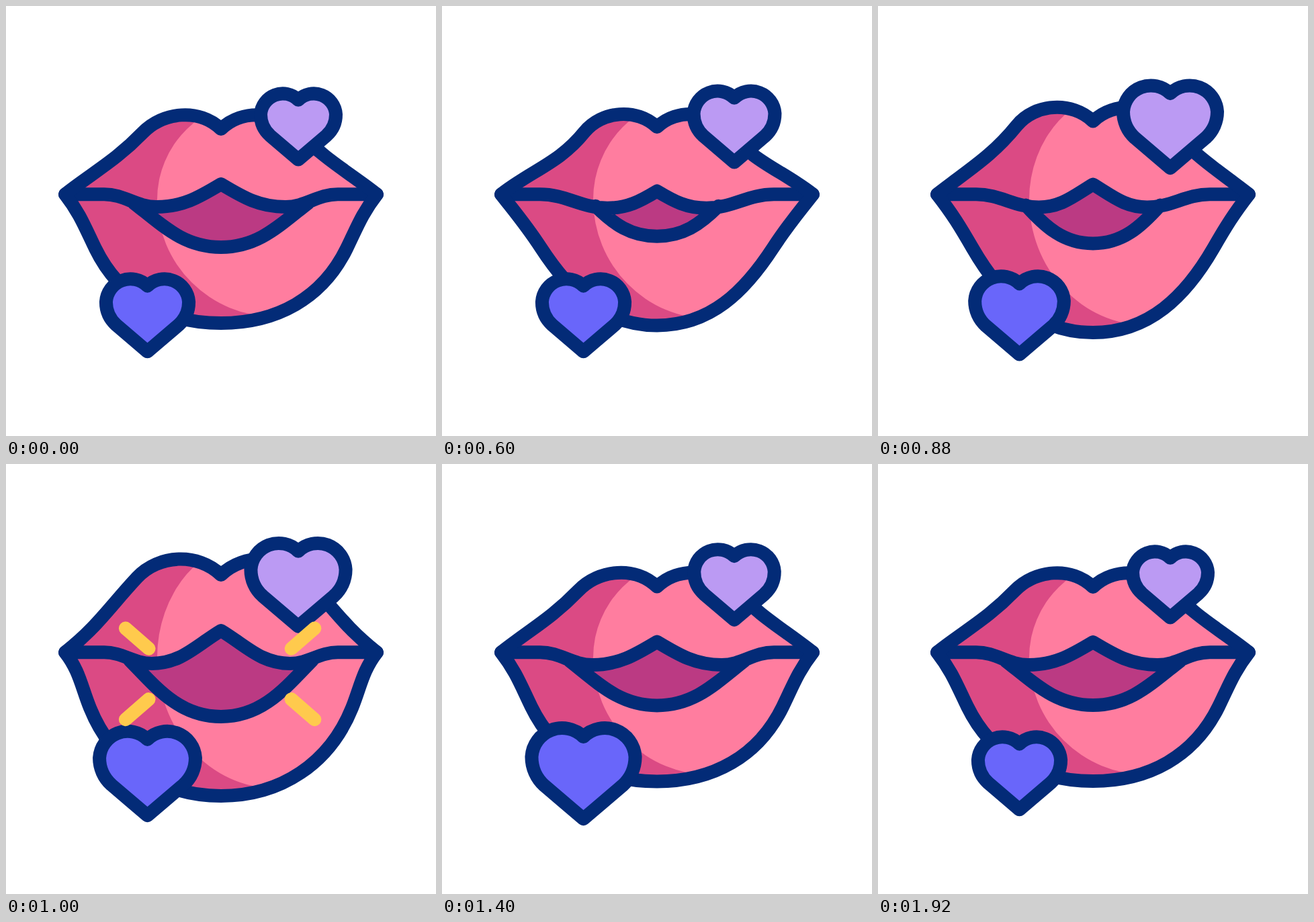
An HTML page for the animation above (2000 ms loop, 640 by 640 pixels).

```html
<!DOCTYPE html>
<html lang="en">
<head>
<meta charset="utf-8">
<title>Kiss</title>
<style>
  html, body { margin: 0; width: 100%; height: 100%; overflow: hidden; background: #fff; }
  svg { display: block; width: 100%; height: 100%; }
  path { fill: none; stroke-width: 20; stroke-linejoin: round; stroke-linecap: round; }
  .ink { stroke: #032b77; }
  #light { fill: #ff7d9f; }
  #mouth { fill: #bb3a83; }
  #lilac { fill: #bb9af3; }
  #blue { fill: #6966fa; }
  #rays { stroke: #ffca4d; }
</style>
</head>
<body>
<svg viewBox="0 0 640 640">
  <clipPath id="clip"><path id="mask"/></clipPath>
  <g clip-path="url(#clip)">
    <rect width="640" height="640" fill="#db4a84"/>
    <path id="light"/>
  </g>
  <path id="mouth"/>
  <path id="seam" class="ink"/>
  <path id="lips" class="ink"/>
  <path id="lilac" class="ink"/>
  <path id="blue" class="ink"/>
  <path id="rays"/>
</svg>
<script>
const LOOP = 2000, STEP = 40;
const MID = 320, LEFT = 88, SEAM = 280.3, FORK = 146;

// Points are [x, y] or [x, y, heading in degrees]; single values are heights at MID.
const rest = {
  brow: [203, 189, -46], bow: 183, cheek: [133, 361, 64], chin: 472,
  fold: [224, 299], tip: 265, corner: [190, 293, 38], floor: 359
};
const pucker = {
  brow: [218, 187, -55], bow: 178, cheek: [156, 357, 52], chin: 478,
  fold: [262, 302], tip: 283, corner: [256, 301, 50], floor: 331
};
const open = {
  brow: [195, 169, -47], bow: 165, cheek: [125, 363, 68], chin: 494,
  fold: [217, 297], tip: 248, corner: [184, 292, 46], floor: 376
};

const draw = (id, d) => document.getElementById(id).setAttribute('d', d);
const mix = (a, b, k) => Array.isArray(a) ? a.map((v, i) => mix(v, b[i], k)) : a + (b - a) * k;
const ease = (t, from, to) => {
  const p = Math.min(1, Math.max(0, (t - from) / (to - from)));
  return p * p * (3 - 2 * p);
};
const blend = (a, b, k) =>
  Object.fromEntries(Object.keys(a).map(key => [key, mix(a[key], b[key], k)]));

// Smooth curve through the nodes, mirrored about MID; handles follow each heading.
function arch(nodes) {
  const left = [nodes[0].slice(0, 2)];
  for (let i = 1; i < nodes.length; i++) {
    const [x0, y0, a0 = 0] = nodes[i - 1], [x1, y1, a1 = 0] = nodes[i];
    const len = 0.38 * Math.hypot(x1 - x0, y1 - y0);
    const step = a => [len * Math.cos(a * Math.PI / 180), len * Math.sin(a * Math.PI / 180)];
    const [ux, uy] = step(a0), [vx, vy] = step(a1);
    left.push([x0 + ux, y0 + uy], [x1 - vx, y1 - vy], [x1, y1]);
  }
  const right = left.slice(0, -1).reverse().map(([x, y]) => [2 * MID - x, y]);
  return left.concat(right);
}
const curve = pts => `${pts[0]}C${pts.slice(1).join(' ')}`;
const loop = (a, b) => `M${curve(a)}L${curve([...b].reverse())}Z`;

function pose(t) {
  if (t < 760) return blend(rest, pucker, ease(t, 400, 760));
  if (t < 1000) return blend(pucker, open, ease(t, 760, 1000));
  return blend(open, rest, ease(t, 1000, 1440));
}

function drawLips(t) {
  const p = pose(t);
  const top = arch([[LEFT, SEAM, -38], p.brow, [MID, p.bow, 44]]);
  const bottom = arch([[LEFT, SEAM, 52], p.cheek, [MID, p.chin]]);
  const upper = arch([[FORK, SEAM], p.fold, [MID, p.tip, -31]]);
  const lower = arch([p.corner, [MID, p.floor]]);
  const outline = loop(top, bottom);
  draw('mask', outline);
  draw('lips', outline);
  draw('mouth', loop(upper, lower));
  draw('seam', `M${LEFT} ${SEAM}L${curve(upper)}H${2 * MID - LEFT}M${curve(lower)}`);

  const y = 288, a = 1.52 * (SEAM - p.bow), b = 0.91 * (p.chin - SEAM);
  draw('light', `M375 ${y - a}A150 ${a} 0 0 0 225 ${y}A175 ${b} 0 0 0 400 ${y + b}H600V${y - a}Z`);
}

function drawHeart(id, cx, cy, s) {
  const at = (x, y) => `${cx + x * s} ${cy + y * s}`;
  const arc = (r, x, y) => `A${r * s} ${r * s} 0 0 0 ${at(x, y)}`;
  draw(id, `M${at(0, -38.5)}${arc(33, -56, -17)}${arc(42, -42, 14.5)}L${at(0, 50.3)}` +
    `L${at(42, 14.5)}${arc(42, 56, -17)}${arc(33, 0, -38.5)}Z`);
}

function drawRays(t) {
  const head = ease(t, 880, 1135), tail = ease(t, 920, 1240);
  let d = '';
  if (head > tail) {
    for (const sx of [-1, 1]) for (const sy of [-1, 1]) {
      const at = k => [318.6 + sx * mix(88, 203.6, k), 312.4 + sy * mix(22, 122.5, k)];
      d += `M${at(tail)}L${at(head)}`;
    }
  }
  draw('rays', d);
}

function frame(now) {
  const t = Math.floor((now % LOOP) / STEP) * STEP;
  drawLips(t);
  drawHeart('lilac', 435, 178.3, 1 + 0.26 * (ease(t, 400, 945) - ease(t, 1000, 1600)));
  drawHeart('blue', 210.5, 459, 1.1 + 0.29 * (ease(t, 680, 1240) - ease(t, 1320, 1920)));
  drawRays(t);
}

let start;
function tick(now) {
  start ??= now;
  frame(now - start);
  requestAnimationFrame(tick);
}
frame(0);
requestAnimationFrame(tick);
</script>
</body>
</html>
```
